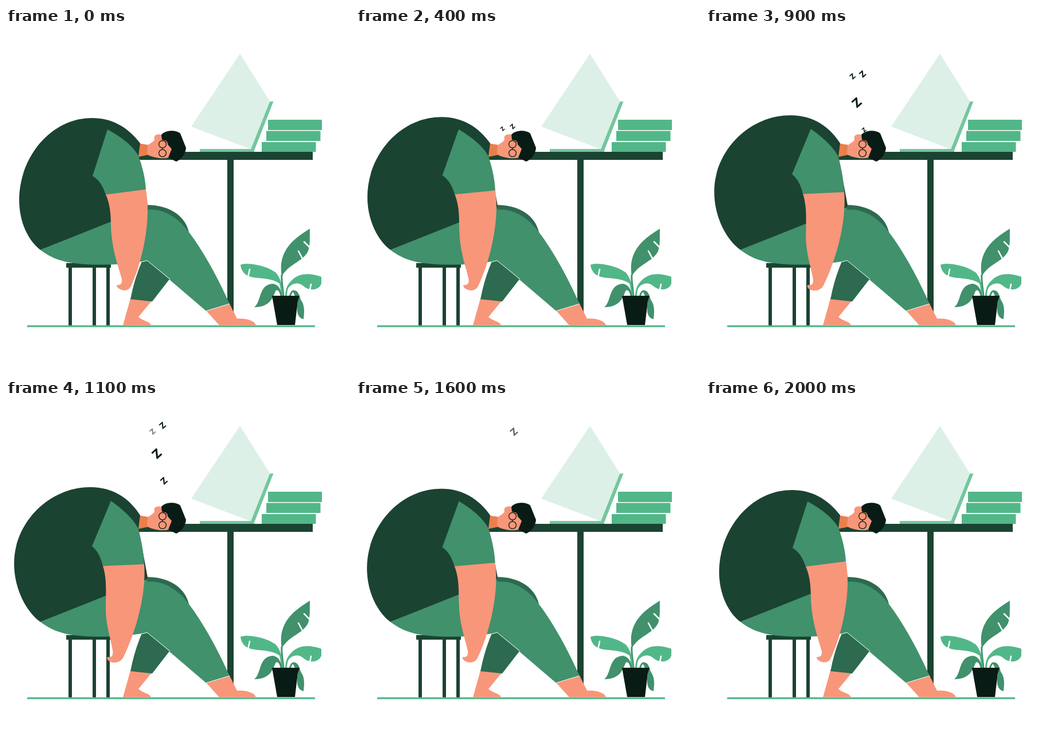
An HTML page that plays this animation: 600 px wide and 600 px high, repeating every 2.1 s.

```html
<!DOCTYPE html>
<html lang="en">
<head>
<meta charset="utf-8">
<title>Asleep at the desk</title>
<style>
  html, body { margin: 0; width: 100%; height: 100%; overflow: hidden; background: #fff; }
  svg { display: block; width: 100vw; height: 100vh; }
  .ink { fill: #081c15; }
  .dark { fill: #1b4332; }
  .deep { fill: #2d6a4f; }
  .mid { fill: #40916c; }
  .light { fill: #52b788; }
  .soft { fill: #74c69d; }
  .pale { fill: #dcf0e7; }
  .skin { fill: #f8967a; }
  .neck { fill: #ea7f4e; }
  .stem { fill: none; stroke-width: 3; }
  .notch { fill: none; stroke: #fff; stroke-width: 2.6; stroke-linecap: round; }
  .glasses { fill: none; stroke: #081c15; stroke-width: 1.3; }
  #snores { font: 800 10px Inter, Roboto, sans-serif; text-anchor: middle; }
</style>
</head>
<body>
<svg viewBox="0 0 600 600">
  <!-- desk, laptop, books -->
  <path class="dark" d="M231 216H535V230H231ZM386 229H397V505H386Z"/>
  <path class="soft" d="M338 211H427L460 128.500L466.500 128L433 213.500V216H338Z"/>
  <path class="pale" d="M408 45L460 127.500L427 211.500L323 172Z"/>
  <path class="light" d="M457 160H551V178H457ZM454 179.500H548.500V197H454ZM446 199H540.500V216H446Z"/>

  <!-- plant -->
  <path class="stem" stroke="#40916c" d="M481 430C480 443 483 452 484 469M495 469C498 456 504 455 509 468"/>
  <path class="stem" stroke="#52b788" d="M468 426C479 437 480 450 482 469M498 443C490 450 489 459 488 469"/>
  <path class="mid" d="M481 433C474 392 497 370 530 350C529.500 365 531 378 527 389C517 409 494 410 481 433Z"/>
  <path class="light" d="M409 413C420 408 453 414 468 425C474 430 477 438 479 447C464 435 443 438 427 434C415 431 410 422 409 413Z"/>
  <path class="light" d="M550 434C536 429 508 423 494 446L490 457C499 442 512 443 521 452C531 459 546 457 550 446Z"/>
  <path class="mid" d="M433 487C446 477 440 448 465 446C475 447 480 456 482 469H479C477 458 473 455 470 459C465 472 459 487 433 487Z"/>
  <path class="mid" d="M500 459C508 455 512 465 514 474C522 484 520 497 519 508C506 505 507 490 509 478Z"/>
  <path class="notch" d="M530 383L520 373M517 402L510 389M422 435L425 421M530 457L532 447"/>
  <path class="ink" d="M464 467H512L509 476L504 518H473Z"/>

  <!-- stool and floor -->
  <path class="dark" d="M105 410H183V418H105ZM109 417H115V519H109ZM151 417H157V519H151ZM175 417H181V519H175Z"/>
  <path class="light" d="M37 518.500H539V521.700H37Z"/>

  <!-- far leg -->
  <path class="skin" d="M217 472L254 476L231 504C240 512 250 511 253 518.500H204Z"/>
  <path class="deep" d="M237 407L246 405L286 437L255 477L217 473Q224 437 237 407Z"/>
  <path class="deep" d="M240 309C278 307 311 323 319 356L240 340Z"/>

  <!-- near leg -->
  <path class="skin" d="M349 493L390 481L403 507C420 506 434 511 436 518.500H372Z"/>
  <path class="mid" d="M60 387L244 312L247 317C274 314 301 331 319 356C345 390 370 437 390 481L349 493.500L246 405.500C229 409 206 412 183 412.500C115 414 88 408 60 387Z"/>
  <path fill="none" stroke="#fff" d="M237 408L246 405.500L286 438M349 493.500L390 481"/>

  <!-- upper body -->
  <path class="neck" d="M230 201L249 204V221L230 225Z"/>
  <path class="dark" id="torso"/>
  <path class="mid" id="sleeve"/>
  <path class="skin" id="arm"/>

  <!-- head -->
  <path class="skin" d="M247 205C251 201 257 199 259 195C257 189 261 184 270 186L292 208L284 226C271 229 254 226 246 220Z"/>
  <path class="ink" d="M271 186C278 178 296 177 304 184L314 209C313 220 306 229 297 233L283 226L289 211L282 203L281 197L272 195Z"/>
  <g class="glasses">
    <circle cx="273" cy="202.700" r="6.400"/>
    <circle cx="273" cy="218.300" r="6.400"/>
    <path d="M273 209V212M278 199L282 197"/>
  </g>
  <g id="snores" class="ink"></g>
</svg>
<script>
const LOOP = 2100, STEP = 100, LEAD = 20;

// Each shape breathes between an exhaled and an inhaled outline.
const shapes = {
  torso: [
    'M234 201C212 172 184 157 150 157C77 157 23 227 23 300C23 340 40 372 60 387L245 313L247 309L231 224Z',
    'M234 201C217 174 189 152 147 152C75 152 14 214 14 285C14 330 36 370 60 387L245 313L247 309L231 224Z'
  ],
  sleeve: [
    'M177 177C197 188 220 203 231 223C238 242 243 262 244 282L174 291C170 278 163 265 151 258Z',
    'M183 176C200 188 222 206 231 225C236 245 240 265 241 287L169 290C166 277 161 264 150 255Z'
  ],
  arm: [
    'M174 290.500L244 281.500C254 333 238 409 218 450C214 459 205 459 198 455C194 453 192 449 194 448C200 449 203 445 202 438C199 425 187 395 184 360C182 340 185 315 174 290.500Z',
    'M169 289.500L241 286.500C245 340 226 405 204 450C199 458 188 460 181 456C176 454 175 450 177 448C184 450 187 446 186 438C184 420 172 390 174 355C174 335 176 312 169 289.500Z'
  ]
};

// start: first visible time, y: height at start, fade: time the fade begins
const snores = [
  { x: 255.5, y: 194, size: 12.5, start: 300, fade: 1000 },
  { x: 273, y: 190, size: 14.5, start: 300, fade: 1090 },
  { x: 263, y: 185, size: 21, start: 600, fade: 1330 },
  { x: 275.5, y: 177.5, size: 16.5, start: 900, fade: 1520 }
];
const RISE = 0.183, DRAG = 0.4, FADE = 230, GROW = 250;

const clamp = v => Math.min(1, Math.max(0, v));

function mix(from, to, k) {
  const ends = to.match(/[\d.]+/g);
  let i = 0;
  return from.replace(/[\d.]+/g, n => (+n + (ends[i++] - n) * k).toFixed(2));
}

const group = document.getElementById('snores');
for (const s of snores) {
  s.el = document.createElementNS('http://www.w3.org/2000/svg', 'text');
  s.el.textContent = 'Z';
  s.el.setAttribute('y', 3.64);
  group.append(s.el);
}

function draw(t) {
  const breath = (1 - Math.cos(2 * Math.PI * (t + LEAD) / LOOP)) / 2;
  for (const [id, [out, full]] of Object.entries(shapes)) {
    document.getElementById(id).setAttribute('d', mix(out, full, breath));
  }
  for (const s of snores) {
    const age = t - s.start;
    const fading = Math.max(0, t - s.fade);
    const scale = s.size / 10 * (0.6 + 0.4 * clamp(age / GROW));
    const y = s.y - (age - fading * DRAG) * RISE;
    s.el.setAttribute('transform', `translate(${s.x} ${y}) rotate(-42) scale(${scale})`);
    s.el.setAttribute('opacity', age < 0 ? 0 : 1 - clamp(fading / FADE));
  }
}

const begin = performance.now();
function tick() {
  const t = (performance.now() - begin) % LOOP;
  draw(Math.floor(t / STEP) * STEP);
  requestAnimationFrame(tick);
}
tick();
</script>
</body>
</html>
```
